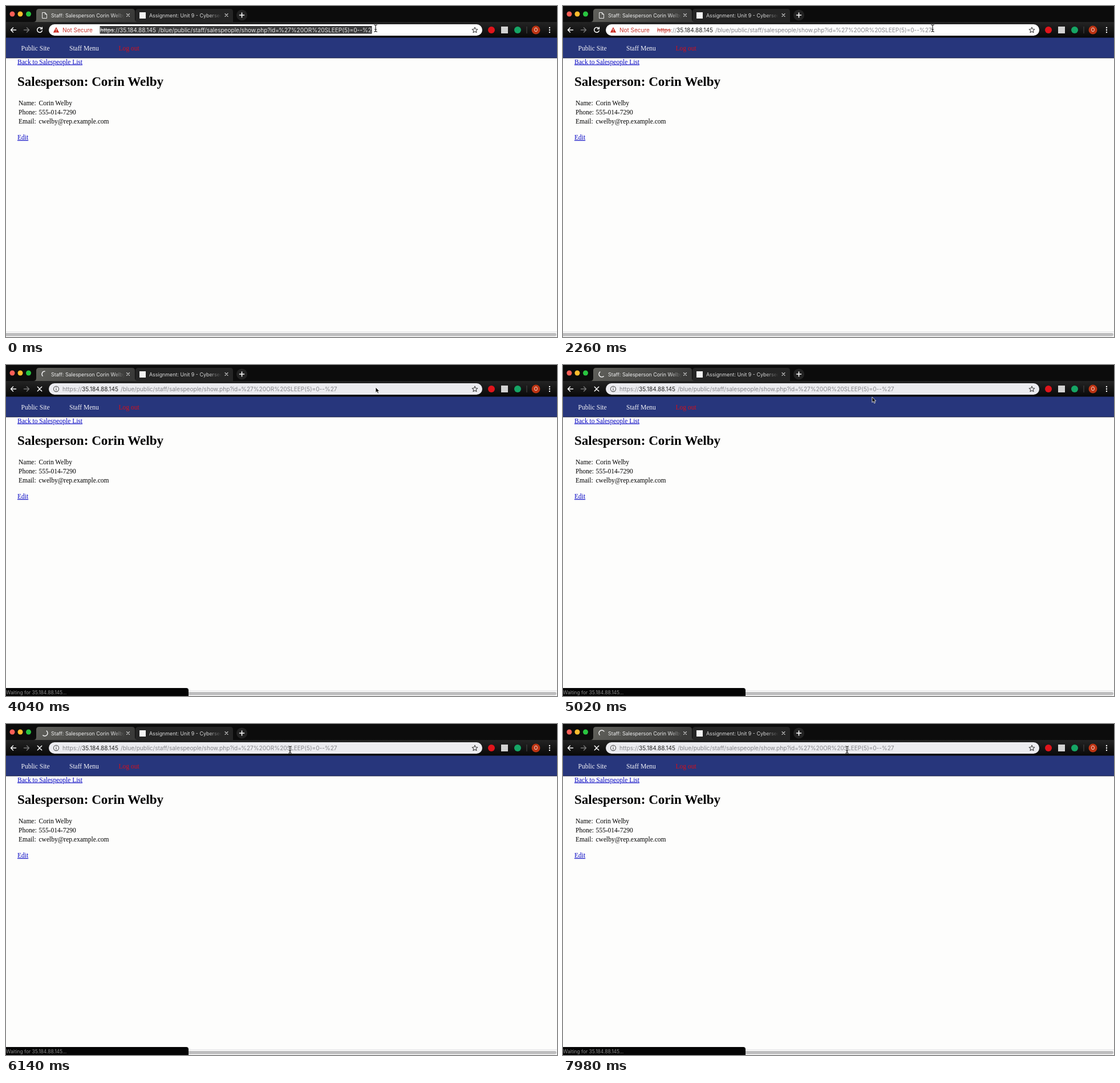
Animation, 966 px wide and 580 px high, one loop 8 s. Source, as an HTML page:

```html
<!DOCTYPE html>
<html lang="en">
<head>
<meta charset="utf-8">
<title>Salesperson page</title>
<style>
  html, body { margin: 0; width: 100%; height: 100%; overflow: hidden; background: #fdfdfc; }
  svg { display: block; width: 100%; height: 100%; }
  text { white-space: pre; }
  .ui { font-family: Inter, Roboto, sans-serif; }
  .tab { font-size: 8.9px; }
  .url { font-size: 10.07px; }
  .page { font: 11.5px "Liberation Serif", "Times New Roman", serif; }
  .link { fill: #0808c4; text-decoration: underline; }
  .line { fill: none; stroke-linecap: round; stroke-linejoin: round; }
  #url .rest { fill: #85858a; }
  #url .host { fill: #222; }
  #url .scheme { fill: #c5352b; text-decoration: line-through; }
  #url.selected text { fill: #e6e6e6; }
  #url.loading .scheme { fill: #85858a; text-decoration: none; }
</style>
</head>
<body>
<svg viewBox="0 0 966 580" preserveAspectRatio="none">
  <defs>
    <linearGradient id="bar" x2="0" y2="1">
      <stop stop-color="#242424"/><stop offset="1" stop-color="#080808"/>
    </linearGradient>
    <linearGradient id="activeTab" x2="1" y2="0.15">
      <stop stop-color="#62625d"/><stop offset="1" stop-color="#3a3a39"/>
    </linearGradient>
    <linearGradient id="fadeA" gradientUnits="userSpaceOnUse" x1="186" x2="208" y1="0" y2="0">
      <stop stop-color="#eee"/><stop offset="1" stop-color="#eee" stop-opacity="0"/>
    </linearGradient>
    <linearGradient id="fadeB" gradientUnits="userSpaceOnUse" x1="354" x2="378" y1="0" y2="0">
      <stop stop-color="#d8d8d8"/><stop offset="1" stop-color="#d8d8d8" stop-opacity="0"/>
    </linearGradient>
  </defs>

  <!-- Page -->
  <rect width="966" height="580" fill="#fdfdfc"/>
  <rect y="55" width="966" height="36" fill="#27367c"/>
  <rect y="90.5" width="966" height="1" fill="#141b40"/>
  <g class="page">
    <g fill="#f4f4f8">
      <text x="26.5" y="78">Public Site</text>
      <text x="111" y="78">Staff Menu</text>
      <text x="197.5" y="78" fill="#d3101c">Log out</text>
    </g>
    <text class="link" x="20" y="101.5">Back to Salespeople List</text>
    <text x="20" y="140" font-size="23.08" font-weight="bold">Salesperson: Corin Welby</text>
    <text x="22" y="174">Name:</text><text x="57.5" y="174">Corin Welby</text>
    <text x="22" y="190">Phone:</text><text x="57.5" y="190">555-014-7290</text>
    <text x="22" y="206">Email:</text><text x="57.5" y="206">cwelby@rep.example.com</text>
    <text class="link" x="20" y="234">Edit</text>
  </g>
  <rect y="570" width="966" height="10" fill="#f8f8f8"/>
  <rect y="570" width="966" height="1" fill="#e4e4e6"/>
  <rect x="-4" y="573" width="969" height="5.5" rx="2.7" fill="#bdbdbe"/>

  <!-- Tab strip -->
  <rect width="966" height="28" fill="#0c0c0c"/>
  <path d="M227 28V10q0-5 5-5H393q5 0 5 5V28Z" fill="#252525"/>
  <path d="M48 28q5 0 5-5V10q0-5 5-5H221q5 0 5 5V23q0 5 5 5Z" fill="url(#activeTab)"/>
  <circle cx="11" cy="14" r="4.5" fill="#fb5f57"/>
  <circle cx="25" cy="14" r="4.5" fill="#fdbc2e"/>
  <circle cx="39.5" cy="14" r="4.5" fill="#29c540"/>
  <g class="ui tab">
    <text x="79" y="19.5" fill="url(#fadeA)">Staff: Salesperson Corin Welby</text>
    <text x="251" y="19.5" fill="url(#fadeB)">Assignment: Unit 9 - Cybersecu</text>
  </g>
  <path class="line" d="M211.5 13.5l5 5m0-5l-5 5M384 13.5l5 5m0-5l-5 5" stroke="#c4c4c4" stroke-width="1.1"/>
  <rect x="234" y="11" width="11" height="11" fill="#f4f4f4"/>
  <circle cx="413.5" cy="16" r="9.5" fill="#222"/>
  <path class="line" d="M409.5 16h8m-4-4v8" stroke="#fff" stroke-width="1.6"/>
  <path id="doc" class="line" d="M64 11.5h4.5l3 3V21.5H64Zm4.5 0v3h3" stroke="#eee" stroke-width="1"/>
  <path id="spinner" class="line" stroke="#eee" stroke-width="1.5"/>

  <!-- Toolbar -->
  <rect y="28" width="966" height="27.5" fill="url(#bar)"/>
  <g class="line" stroke="#fff" stroke-width="1.5">
    <path d="M17.5 42H8.5m4-4l-4 4l4 4"/>
    <path d="M31.5 42h9m-4-4l4 4l-4 4" stroke="#777"/>
    <path id="reload" d="M62.6 39.2A4.4 4.4 0 1 0 63.3 43.2M63.4 37.3V40.3H60.4"/>
    <path id="stop" d="M55.3 38.3l7.4 7.4m0-7.4l-7.4 7.4"/>
  </g>
  <rect id="field" x="75" y="32" width="760" height="20" rx="10"/>
  <g id="warning">
    <path d="M88 37l5.2 9.5H82.8Z" fill="#c8281e"/>
    <path d="M88 40v3.2m0 1.2v1" stroke="#fff" stroke-width="1.1"/>
    <text class="ui" x="99" y="45.5" font-size="10" fill="#c8352c">Not Secure</text>
  </g>
  <g id="info">
    <circle cx="88" cy="42" r="4.6" fill="none" stroke="#555" stroke-width="1.1"/>
    <path d="M88 41.5v3m0-5.2v1.1" stroke="#555" stroke-width="1.2"/>
  </g>
  <g id="url" class="ui url">
    <rect id="selection" x="164.5" y="35" width="477" height="13.5" fill="#3a3a3b"/>
    <text class="scheme" x="165" y="45.5">https</text>
    <text class="rest" x="189" y="45.5">://</text>
    <text class="host" x="199" y="45.5">35.184.88.145</text>
    <text class="rest" x="267" y="45.5">/blue/public/staff/salespeople/show.php?id=</text>
    <text class="rest" x="478" y="45.5">%27%20OR%20SLEEP(5)=0--%27</text>
  </g>
  <rect id="caret" x="641" y="36" width="1" height="12" fill="#333"/>
  <path class="line" d="M822 37.3l1.4 3.2 3.4.3-2.6 2.3.8 3.4-3-1.8-3 1.8.8-3.4-2.6-2.3 3.4-.3Z" stroke="#444" stroke-width="1.1"/>
  <circle cx="851" cy="42" r="6" fill="#e0141b"/>
  <rect x="868" y="36" width="12" height="12" fill="#d2d2d2"/>
  <circle cx="897" cy="42" r="6" fill="#16a565"/>
  <rect x="912.5" y="36" width="1" height="12" fill="#4a4a4a"/>
  <circle cx="929" cy="42" r="7.5" fill="#bd3413"/>
  <text class="ui" x="929" y="45" font-size="8.5" fill="#fff" text-anchor="middle">O</text>
  <g fill="#fff"><circle cx="953" cy="38" r="1.2"/><circle cx="953" cy="42" r="1.2"/><circle cx="953" cy="46" r="1.2"/></g>

  <!-- Status bubble -->
  <g id="status">
    <path d="M0 566H316q4 0 4 4V580H0Z" fill="#050505"/>
    <text class="ui" x="0" y="576.5" font-size="8.45" fill="#8d8d8d">Waiting for 35.184.88.145...</text>
  </g>

  <!-- Pointers, drawn around their hot spots -->
  <g id="ibeam" class="line">
    <path d="M-2.5-6q2.5 0 2.5 1.5V4.5q0 1.5-2.5 1.5M2.5-6q-2.5 0-2.5 1.5M0 4.5q0 1.5 2.5 1.5" stroke="#fff" stroke-width="2.4" stroke-opacity=".7"/>
    <path d="M-2.5-6q2.5 0 2.5 1.5V4.5q0 1.5-2.5 1.5M2.5-6q-2.5 0-2.5 1.5M0 4.5q0 1.5 2.5 1.5M-1.5 2h3" stroke="#111" stroke-width="1.1"/>
  </g>
  <path id="arrow" d="M0 0V9.5L2.2 7.5L3.8 11L5.5 10.2L4 6.9H6.8Z" fill="#0a0a0a" stroke="#fff" stroke-width=".8"/>
</svg>
<script>
  const LOOP = 8000, DESELECT = 420, BLINK = 1500, LOAD = 2610, TURN = 3960;
  const STATUS_IN = 2880, STATUS_FADE = 340, ARROW_IN = 3000, ARROW_OUT = 5620;
  const pointerPath = [[0, 648, 39], [4300, 648, 39], [5380, 505, 62], [5460, 505, 62], [5840, 498, 45]];

  const $ = id => document.getElementById(id);
  const show = (id, on) => $(id).setAttribute('visibility', on ? 'visible' : 'hidden');
  const clamp = v => Math.min(1, Math.max(0, v));
  const ease = v => v * v * (3 - 2 * v);

  function pointerAt(t) {
    const i = pointerPath.findIndex(p => p[0] > t);
    if (i < 0) return pointerPath[pointerPath.length - 1].slice(1);
    const [t0, x0, y0] = pointerPath[i - 1], [t1, x1, y1] = pointerPath[i];
    const k = ease((t - t0) / (t1 - t0));
    return [x0 + (x1 - x0) * k, y0 + (y1 - y0) * k];
  }

  // Counter-clockwise arc that grows from twelve o'clock to half a turn.
  function spinnerArc(elapsed) {
    const end = 90 + 360 * elapsed / TURN, start = Math.max(end - 180, 90);
    const point = deg => {
      const a = deg * Math.PI / 180;
      return `${(68 + 5 * Math.cos(a)).toFixed(2)} ${(16 - 5 * Math.sin(a)).toFixed(2)}`;
    };
    return `M${point(start)}A5 5 0 0 0 ${point(end)}`;
  }

  function render(t) {
    const loading = t >= LOAD, selected = t < DESELECT;
    const caretOn = Math.floor((t - DESELECT) / BLINK) % 2 === 0;
    $('url').setAttribute('class', 'ui url' + (selected ? ' selected' : loading ? ' loading' : ''));
    $('url').setAttribute('transform', `translate(${loading ? -66 : 0} 0)`);
    $('field').setAttribute('fill', loading ? '#ececf0' : '#fff');
    show('selection', selected);
    show('caret', !selected && !loading && caretOn);
    for (const id of ['doc', 'reload', 'warning']) show(id, !loading);
    for (const id of ['spinner', 'stop', 'info']) show(id, loading);
    if (loading) $('spinner').setAttribute('d', spinnerArc(t - LOAD));
    $('status').setAttribute('opacity', clamp((t - STATUS_IN) / STATUS_FADE));

    const [x, y] = pointerAt(t), arrow = t >= ARROW_IN && t < ARROW_OUT;
    show('arrow', arrow);
    show('ibeam', !arrow);
    $(arrow ? 'arrow' : 'ibeam').setAttribute('transform', `translate(${x} ${y})`);
  }

  const begin = performance.now();
  function tick() {
    render((performance.now() - begin) % LOOP);
    requestAnimationFrame(tick);
  }
  tick();
</script>
</body>
</html>
```
